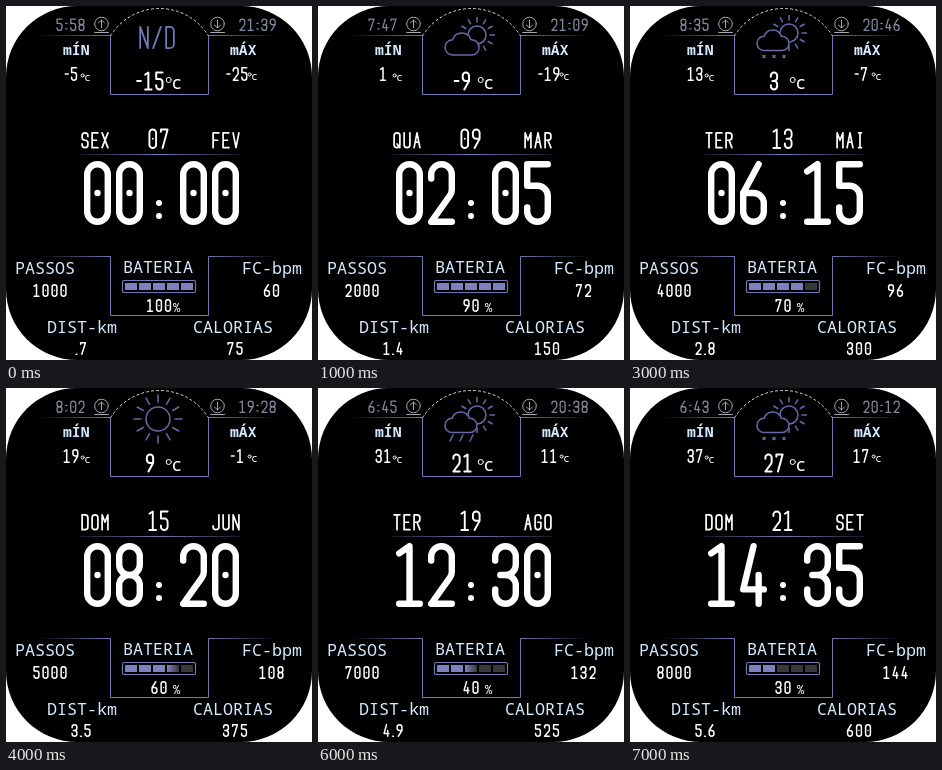
These frames come from a looping animation (306x354 px, 8 s). An HTML page with a canvas:

```html
<!DOCTYPE html>
<html lang="pt">
<head>
<meta charset="utf-8">
<style>
html, body { margin: 0; width: 100%; height: 100%; overflow: hidden; background: #fff; }
canvas { display: block; }
</style>
</head>
<body>
<canvas id="face" width="306" height="354"></canvas>
<script>
const ctx = document.getElementById('face').getContext('2d');
const PURPLE = '#7478b8', ICON = '#666aa8', LABEL = '#d2eaff', DIM = '#7f879c', WHITE = '#fff';

// Condensed line alphabet on a 4 x 8 grid: "xy" points, "~" rounds a corner, ";" lifts the pen.
const GLYPHS = {
  0: '04 ~00 ~40 ~48 ~08 04;24 24', 1: '01 20 28;08 48', 2: '02 ~00 ~40 ~44 08 48',
  3: '02 ~00 ~40 ~44 14;14 ~44 ~48 ~08 06', 4: '20 06 46;34 38', 5: '40 00 03 ~43 ~48 ~08 06',
  6: '30 04 ~08 ~48 ~44 04', 7: '01 00 40 18', 8: '24 ~04 ~00 ~40 ~44 24 ~04 ~08 ~48 ~44 24',
  9: '18 44 ~40 ~00 ~04 44', '.': '18 38', ':': '13 33;17 37', '-': '04 44', '/': '40 08',
  A: '08 20 48;15 35', B: '00 08 ~48 ~44 04;08 00 ~40 ~44 04', D: '00 08 ~48 ~40 00 08',
  E: '40 00 08 48;04 34', F: '40 00 08;04 34', G: '42 ~40 ~00 ~08 ~48 44 24', I: '20 28;10 30;18 38',
  J: '40 ~48 ~08 06', L: '00 08 48', M: '08 00 24 40 48', N: '08 00 48 40', O: '04 ~00 ~40 ~48 ~08 04',
  Q: '04 ~00 ~40 ~48 ~08 04;26 48', R: '08 00 ~40 ~44 04;24 48', S: '42 ~40 ~00 ~04 ~44 ~48 ~08 06',
  T: '00 40;20 28', U: '00 ~08 ~48 40', V: '00 28 40', X: '00 48;40 08'
};
const NARROW = { '.': 0.45, ':': 0.65, '-': 0.7 };

const STATES = [
  { day: 'SEX', month: 'FEV', rise: '5:58', set: '21:39', sky: 'none' },
  { day: 'QUA', month: 'MAR', rise: '7:47', set: '21:09', sky: 'cloudy' },
  { day: 'SEX', month: 'ABR', rise: '8:53', set: '21:58', sky: 'rain' },
  { day: 'TER', month: 'MAI', rise: '8:35', set: '20:46', sky: 'snow' },
  { day: 'DOM', month: 'JUN', rise: '8:02', set: '19:28', sky: 'sunny' },
  { day: 'SEX', month: 'JUL', rise: '6:48', set: '21:01', sky: 'overcast' },
  { day: 'TER', month: 'AGO', rise: '6:45', set: '20:38', sky: 'rain' },
  { day: 'DOM', month: 'SET', rise: '6:43', set: '20:12', sky: 'snow' }
];

function pen(color, width) {
  ctx.strokeStyle = color;
  ctx.lineWidth = width;
}

function line(...p) {
  ctx.beginPath();
  for (let i = 0; i < p.length; i += 2) ctx.lineTo(p[i], p[i + 1]);
  ctx.stroke();
}

function circle(x, y, r) {
  ctx.beginPath();
  ctx.arc(x, y, r, 0, 7);
}

function ring(x, y, r) {
  circle(x, y, r);
  ctx.stroke();
}

function glyph(char, x, y, w, h, weight) {
  const sx = (w - weight) / 4, sy = (h - weight) / 8;
  ctx.beginPath();
  for (const part of GLYPHS[char].split(';')) {
    const pts = part.split(' ').map(s => {
      const [px, py] = s.slice(-2);
      return { x: x + weight / 2 + px * sx, y: y + weight / 2 + py * sy, round: s[0] === '~' };
    });
    pts.forEach((p, i) => {
      const next = pts[i + 1];
      if (!i) ctx.moveTo(p.x, p.y);
      else if (p.round) ctx.arcTo(p.x, p.y, next.x, next.y, sx * 2);
      else ctx.lineTo(p.x + 0.01, p.y);
    });
  }
  ctx.stroke();
}

// Centred on cx; size is [glyph width, height, advance, line weight].
function write(value, cx, top, [w, h, step, weight], color = WHITE) {
  const chars = [...String(value)], ratio = c => NARROW[c] || 1;
  let x = cx - chars.reduce((sum, c) => sum + ratio(c), 0) * step / 2;
  pen(color, weight);
  for (const c of chars) {
    glyph(c, x + ratio(c) * (step - w) / 2, top, w * ratio(c), h, weight);
    x += ratio(c) * step;
  }
}

const SMALL = [6.3, 13, 9, 1.5], DEGREES = [6.3, 14, 8.6, 1.5], SUN_TIME = [6.2, 12.5, 8.3, 1.3],
  NAME = [7.5, 16.5, 10, 1.7], DATE = [8.6, 20.5, 11.5, 1.9], TEMP = [8.3, 19, 11, 2],
  ABSENT = [9.5, 23, 13, 1.8], CLOCK = [27, 64, 32, 6.4];

function label(text, x, y, size = 16.7, weight = 400, color = LABEL) {
  ctx.font = `${weight} ${size}px "Noto Sans Mono", monospace`;
  ctx.fillStyle = color;
  ctx.fillText(text, x, y);
}

function celsius(x, y, size) {
  pen(WHITE, 1);
  ring(x + size * 0.15, y - size * 0.5, size * 0.14);
  label('c', x + size * 0.3, y, size, 400, WHITE);
}

// Frame half: a box in the middle with lines fading out to both sides.
function frame(edge, far) {
  const fade = ctx.createLinearGradient(32, 0, 273, 0);
  fade.addColorStop(0, '#7478b800');
  fade.addColorStop(0.3, PURPLE);
  fade.addColorStop(0.7, PURPLE);
  fade.addColorStop(1, '#7478b800');
  pen(fade, 1);
  line(32, edge, 104.5, edge, 104.5, far, 202.5, far, 202.5, edge, 273, edge);
}

function horizonIcon(x, dir) {
  pen('#a5a8ae', 1);
  ring(x, 18, 6.8);
  line(x, 18 - 4 * dir, x, 18 + 4 * dir);
  line(x - 3, 18 + dir, x, 18 + 4 * dir, x + 3, 18 + dir);
  line(x - 7, 26.5, x + 7, 26.5);
}

function sun(x, y, r, inner, outer) {
  ring(x, y, r);
  for (let i = 0; i < 12; i++) {
    const c = Math.cos(i * Math.PI / 6), s = Math.sin(i * Math.PI / 6);
    line(x + c * inner, y + s * inner, x + c * outer, y + s * outer);
  }
}

const CLOUD = new Path2D('M8 24a8 8 0 0 1 0-16a10 10 0 0 1 19 0a8 8 0 0 1 1 16z');
function cloud(x, y, scale) {
  ctx.save();
  ctx.translate(x, y);
  ctx.scale(scale, scale);
  ctx.lineWidth /= scale;
  ctx.fillStyle = '#000';
  ctx.fill(CLOUD);
  ctx.stroke(CLOUD);
  ctx.restore();
}

function weather(sky) {
  if (sky === 'none') return write('N/D', 151, 20, ABSENT, PURPLE);
  pen(ICON, 1.5);
  if (sky === 'sunny') return sun(152, 31, 12, 17, 24);
  if (sky === 'overcast') {
    cloud(150, 17, 0.76);
    return cloud(128, 23, 1);
  }
  if (sky === 'cloudy') {
    sun(159, 29, 9, 13, 17.5);
    return cloud(127, 26, 0.96);
  }
  sun(159, 27, 9, 13, 17.5);
  cloud(127, 23, 0.9);
  for (let i = 0; i < 3; i++) {
    const x = 134 + i * 10;
    if (sky === 'rain') line(x + 1, 47, x - 2, 53);
    else {
      line(x - 1, 49.5, x + 1, 51.5);
      line(x + 1, 49.5, x - 1, 51.5);
    }
  }
}

function battery(percent) {
  const level = Math.min(5, (percent + 10) / 20), full = '#7d81be', empty = '#38383b';
  pen(PURPLE, 1.2);
  ctx.beginPath();
  ctx.roundRect(116.5, 274.5, 73, 12, 1.5);
  ctx.stroke();
  for (let i = 0; i < 5; i++) {
    const x = 119 + i * 14, part = level - i;
    ctx.fillStyle = part >= 1 ? full : empty;
    if (part > 0 && part < 1) {
      const fade = ctx.createLinearGradient(x, 0, x + 12, 0);
      fade.addColorStop(0, full);
      fade.addColorStop(1, empty);
      ctx.fillStyle = fade;
    }
    ctx.fillRect(x, 277, 12, 7);
  }
  write(percent, 153, 293, SMALL);
  label('%', 167, 306, 12, 400, WHITE);
}

function draw(n) {
  const state = STATES[n], two = v => String(v).padStart(2, '0');
  ctx.clearRect(0, 0, 306, 354);
  ctx.lineCap = ctx.lineJoin = 'round';
  ctx.fillStyle = '#000';
  ctx.beginPath();
  ctx.roundRect(0, 0, 306, 354, 71);
  ctx.fill();

  frame(29.5, 88.5);
  frame(250.5, 309.5);
  const rule = ctx.createLinearGradient(74, 0, 234, 0);
  ['#7478b833', PURPLE, '#7478b833'].forEach((c, i) => rule.addColorStop(i / 2, c));
  pen(rule, 1);
  line(74, 148.5, 234, 148.5);

  pen('#ddd', 1);
  ctx.setLineDash([2, 3]);
  ctx.beginPath();
  ctx.arc(153.5, 60, 57.5, Math.PI + 0.56, -0.56);
  ctx.stroke();
  ctx.setLineDash([]);

  horizonIcon(95.5, -1);
  horizonIcon(211.5, 1);
  write(state.rise, 64.5, 12.5, SUN_TIME, DIM);
  write(state.set, 251.5, 12.5, SUN_TIME, DIM);

  label('mÍN', 57, 49, 14.7, 600);
  label('mÁX', 224, 49, 14.7, 600);
  write(6 * n - 5, 65, 61, DEGREES);
  write(6 * n - 25, 231, 61, DEGREES);
  celsius(75, 75, 11);
  celsius(242, 74, 11);

  weather(state.sky);
  write(6 * n - 15, 144, 65.5, TEMP);
  celsius(160, 83, 18);

  write(state.day, 89, 126, NAME);
  write(two(7 + 2 * n), 152.5, 122.5, DATE);
  write(state.month, 220, 126, NAME);
  write(two(2 * n), 107.5, 155, CLOCK);
  write(two(5 * n), 203.5, 155, CLOCK);
  ctx.fillStyle = WHITE;
  for (const y of [197, 210]) {
    circle(153, y, 3);
    ctx.fill();
  }

  label('PASSOS', 9, 268);
  label('BATERIA', 117, 267);
  label('FC-bpm', 236, 268);
  label('DIST-km', 41, 327);
  label('CALORIAS', 187, 327);
  write(1000 * (n + 1), 44, 278, SMALL);
  write(60 + 12 * n, 265.5, 278, SMALL);
  write((0.7 * (n + 1)).toFixed(1).replace(/^0/, ''), 75, 336, SMALL);
  write(75 * (n + 1), 229, 336, SMALL);
  battery(100 - 10 * n);
}

const start = performance.now();
function tick() {
  draw(Math.floor((performance.now() - start) / 1000) % STATES.length);
  requestAnimationFrame(tick);
}
tick();
</script>
</body>
</html>
```
